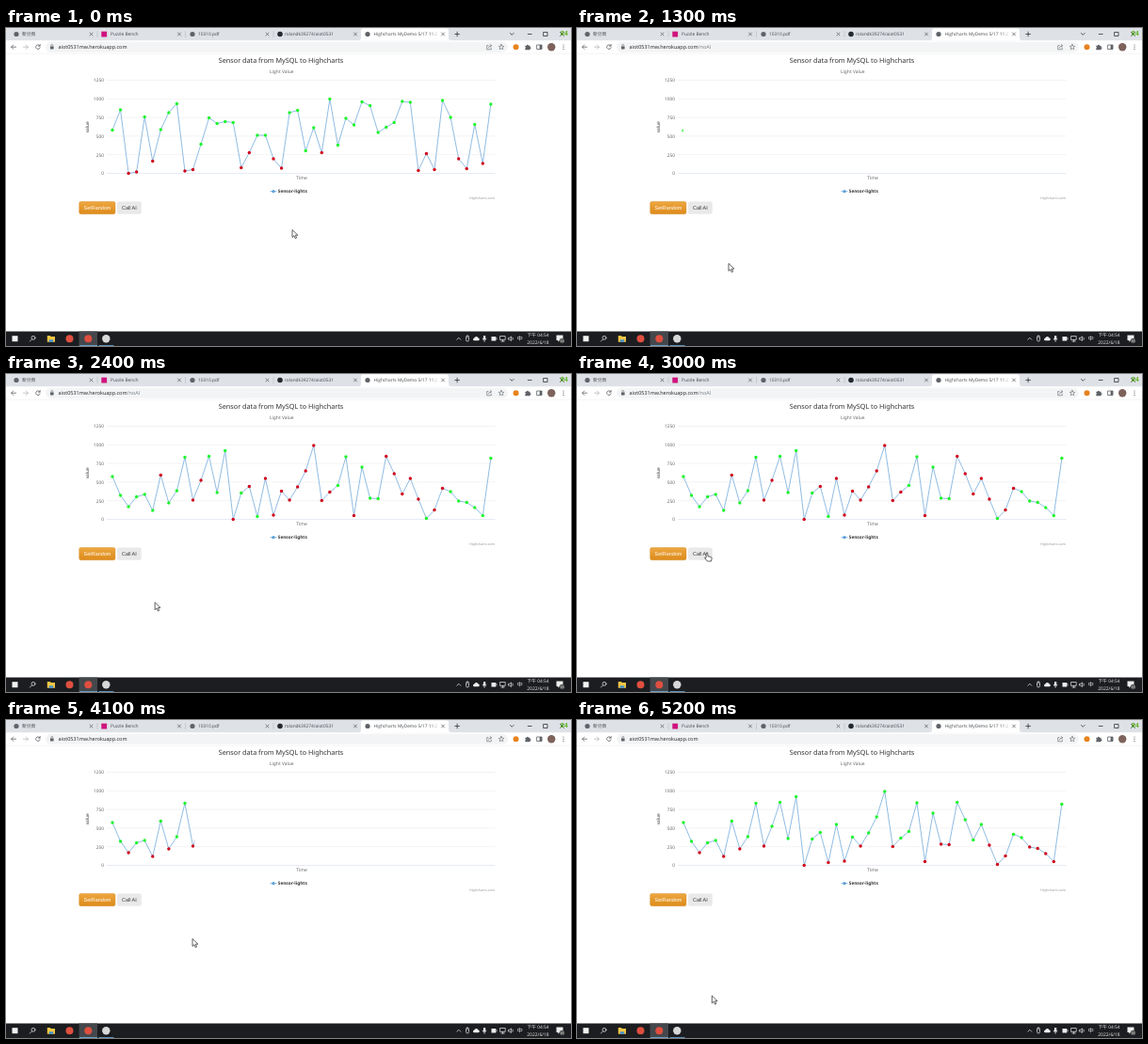
An HTML page for the animation above (5.3 s loop, 600x338 px).

```html
<!DOCTYPE html>
<html>
<head>
<meta charset="utf-8">
<style>
html, body { margin: 0; width: 100%; height: 100%; overflow: hidden; background: #fff; }
svg { display: block; width: 600px; height: 338px; }
text { font: 4.8px "Open Sans", "Noto Sans", "Noto Sans CJK TC", "Noto Sans CJK", sans-serif; text-rendering: geometricPrecision; white-space: pre; }
#chart text { font-family: "Noto Sans", sans-serif; }
.page { font: 5.47px "Liberation Sans", Arial, sans-serif; fill: #333; }
.mid { text-anchor: middle; }
.end { text-anchor: end; }
.ink { fill: none; stroke: #5f6368; stroke-width: .8; stroke-linecap: round; stroke-linejoin: round; }
.tray { fill: none; stroke: #eee; stroke-width: .7; stroke-linecap: round; stroke-linejoin: round; }
</style>
</head>
<body>
<svg viewBox="0 0 600 338">
  <defs>
    <linearGradient id="amber" x2="0" y2="1"><stop stop-color="#eda741"/><stop offset="1" stop-color="#dd8b1a"/></linearGradient>
    <linearGradient id="fade"><stop stop-color="#fff" stop-opacity="0"/><stop offset="1" stop-color="#fff"/></linearGradient>
    <clipPath id="reveal"><rect id="wipe" x="107" y="50" width="0" height="110"/></clipPath>
    <clipPath id="tabClip"><rect x="380" y="0" width="79.5" height="13"/></clipPath>
  </defs>
  <rect width="600" height="338" fill="#fff"/>

  <!-- tab strip -->
  <rect width="600" height="13.2" fill="#dee1e6"/>
  <path d="M374 13.2q3 0 3-3V3q0-2.5 2.5-2.5H467.500q2.500 0 2.500 2.500v7.200q0 3 3 3z" fill="#fff"/>
  <path class="ink" style="stroke:#a5a9ae;stroke-width:.4" d="M97 3.500v6M190.500 3.500v6M284 3.500v6"/>
  <circle cx="11" cy="6.500" r="2.600" fill="#5f6368"/>
  <rect x="101.300" y="3.700" width="5.800" height="5.800" fill="#d0127d"/>
  <circle cx="198" cy="6.500" r="2.600" fill="#5f6368"/>
  <circle cx="291" cy="6.500" r="2.800" fill="#24292e"/>
  <g fill="#45494d">
    <text x="17" y="8.400">新分頁</text>
    <text x="111" y="8.400">Puzzle Bench</text>
    <text x="204" y="8.400">10310.pdf</text>
    <text x="296" y="8.400">rolandk39274/aiot0531</text>
    <text id="tab" x="390.500" y="8.400" clip-path="url(#tabClip)"></text>
  </g>
  <rect x="451" y="2" width="9" height="9" fill="url(#fade)"/>
  <circle id="favicon" cx="384" cy="6.500" r="2.600" fill="#5f6368"/>
  <path id="spinner" d="M384 4a2.500 2.500 0 0 1 2.500 2.500" fill="none" stroke="#1a73e8" stroke-width=".8"/>
  <g id="closers" class="ink"></g>
  <path class="ink" style="stroke:#333" d="M476.800 6.500h4.600M479.100 4.200v4.600M535.500 5.500l1.800 1.800 1.800-1.800M554.300 6.500h3.800M571 4.500h4v4h-4zM588.500 4.500l4 4m0-4l-4 4"/>
  <text x="588.800" y="7.800" fill="#62b52c" style="font-size:7px;font-weight:700">84</text>

  <!-- toolbar -->
  <rect x="42" y="14.800" width="491" height="10.900" rx="5.450" fill="#f3f4f5"/>
  <path d="M0 27.200H600" stroke="#e4e6e8" stroke-width=".4"/>
  <path class="ink" d="M10.500 20.200H5.700M7.800 18l-2.200 2.200 2.200 2.200"/>
  <path class="ink" style="stroke:#b5b8bc" d="M18.500 20.200h4.800M21.200 18l2.200 2.200-2.200 2.200"/>
  <path id="reload" class="ink" d="M35.700 18.600a2.300 2.300 0 1 0 .5 2.200M36.200 17.500v1.700h-1.700"/>
  <path id="stop" class="ink" d="M31.800 18l4 4m0-4l-4 4"/>
  <rect x="47" y="19.400" width="3.600" height="3" rx=".4" fill="#5f6368"/>
  <path class="ink" style="stroke-width:.6" d="M47.800 19.300v-.8a1 1 0 0 1 2 0v.8"/>
  <text x="55.500" y="22" fill="#202124" style="font-size:5.470px">aiot0531mw.herokuapp.com<tspan id="path" fill="#777b80">/noAI</tspan></text>
  <path class="ink" style="stroke-width:.6" d="M512 18.500h-1.300v4.300h4.600v-1.600M512.300 21q.3-2.200 3-2.200M514.200 17.500l1.500 1.300-1.500 1.300"/>
  <path class="ink" style="stroke-width:.6" d="M526 17.400l.8 1.800 2 .2-1.500 1.300.4 2-1.700-1-1.700 1 .4-2-1.500-1.300 2-.2z"/>
  <circle cx="541.500" cy="20.200" r="3" fill="#e8821e"/>
  <path d="M551.300 18.700h1.600a1 1 0 0 1 2 0h1.600v1.600a1 1 0 0 1 0 2v.9h-5.200v-1.500a.9.900 0 0 0 0-1.700z" fill="#5f6368"/>
  <path class="ink" d="M564 18h5v4.500h-5z"/><rect x="566.600" y="18" width="2.500" height="4.500" fill="#5f6368"/>
  <circle cx="579.200" cy="20.200" r="4.200" fill="#7d635c"/>
  <g fill="#5f6368"><circle cx="592" cy="18" r=".6"/><circle cx="592" cy="20.200" r=".6"/><circle cx="592" cy="22.400" r=".6"/></g>

  <!-- web page -->
  <g id="chart">
    <text class="mid" x="292" y="37.300" fill="#333" style="font-size:7.250px">Sensor data from MySQL to Highcharts</text>
    <text class="mid" x="292.800" y="48.200" fill="#666" style="font-size:4.900px">Light Value</text>
    <g id="grid"></g>
    <text class="mid" x="314" y="161.300" fill="#666" style="font-size:5px">Time</text>
    <text class="mid" transform="translate(88.300 105.300) rotate(-90)" fill="#333">value</text>
    <path d="M280.500 173.700h7" stroke="#6aa8dd" stroke-width=".8"/><circle cx="284" cy="173.700" r="1.600" fill="#5b9fd8"/>
    <text x="288.800" y="175.300" fill="#333" style="font-size:4.750px;font-weight:700">Sensor-lights</text>
    <text class="end" x="519" y="182.400" fill="#999" style="font-size:3.650px">Highcharts.com</text>
    <g clip-path="url(#reveal)"><g id="seriesA"></g><g id="seriesB"></g><g id="seriesC"></g></g>
  </g>
  <text id="insert" class="page" x="77.300" y="33.400">Insert Highchart Here</text>
  <rect id="focus" x="77.700" y="184.500" width="38.300" height="13.200" rx="1.700" fill="url(#amber)"/>
  <text class="page mid" x="97" y="192.900" style="fill:#fff">SetRandom</text>
  <rect x="118" y="184.500" width="25.700" height="13.200" rx="1.700" fill="#e9e9e9"/>
  <text class="page mid" x="130.900" y="192.900">Call AI</text>
  <g id="status">
    <path d="M0 314H198.500q1.500 0 1.500 1.500V322.500H0z" fill="#dee1e6"/>
    <text x="1.500" y="320" fill="#5f6368" style="font-size:4.700px">正在等候 aiot0531mw.herokuapp.com...</text>
  </g>

  <!-- taskbar -->
  <rect y="322.500" width="600" height="15.500" fill="#1b1d20"/>
  <rect x="77.500" y="322.500" width="19.500" height="15.500" fill="#44474b"/>
  <path d="M78 337.600h19M98.500 337.600h16" stroke="#76b9ed" stroke-width=".8"/>
  <rect x="6.500" y="327.200" width="6" height="6" fill="#f2f2f2"/>
  <circle class="tray" cx="29" cy="329.300" r="2"/><path class="tray" d="M27.500 330.900l-2.200 2.200"/>
  <path d="M43.800 327h3l1 1h4.200v5.700h-8.200z" fill="#f5c644"/><rect x="45.700" y="331.300" width="4.500" height="2.400" fill="#3f93d4"/>
  <circle cx="67.500" cy="330.200" r="4" fill="#df4f3f"/>
  <circle cx="87.300" cy="330.200" r="4" fill="#df4f3f"/>
  <circle cx="106.300" cy="330.200" r="4.200" fill="#d8d8d8"/>
  <path class="tray" d="M478.800 331.200l2-2 2 2M488.500 328.500q0-1.500 1.500-1.500t1.500 1.500v3q0 1.500-1.500 1.500t-1.500-1.500zM490 327v2.200"/>
  <path d="M497 332.300a1.500 1.500 0 0 1 .3-2.900 2.200 2.200 0 0 1 4-.2 1.600 1.600 0 0 1 .4 3.100zM507 327h2.200v4H507zM515.500 328h4.800v4.400h-4.800z" fill="#eee"/>
  <path class="tray" d="M506.300 330q0 2 1.800 2t1.800-2M508.100 332v1.300M521 329.500v1.400M525 327.500h5.200v3.900H525zM527.600 331.400v1.700M526 333.100h3.200M533.800 329.300h1.100l1.500-1.400v4.600l-1.500-1.400h-1.100zM538 329q.9 1.200 0 2.400"/>
  <g class="mid" fill="#f0f0f0">
    <text x="545.700" y="332.300" style="font-size:6px">中</text>
    <text x="565" y="328.400">下午 04:54</text>
    <text x="565" y="335.800" style="font-size:4.950px">2022/6/18</text>
  </g>
  <path d="M584.500 326.500h7v5.500h-3.500l-1.700 1.700V332h-1.800z" fill="#eee"/>
  <circle cx="590.500" cy="332.500" r="2.700" fill="#555"/>
  <text class="mid" x="590.500" y="333.800" fill="#fff" style="font-size:3.600px">16</text>

  <path id="arrow" d="M0 0V8l1.900-1.700 1.300 2.900 1.400-.6-1.300-2.900H5.900z" fill="#fff" stroke="#222" stroke-width=".7" stroke-linejoin="round"/>
  <path id="hand" d="M-.9.700q.9-1.300 1.800 0V3.700l3.200.7q1 .3 1 1.300L4.600 9H.4L-2.300 5.700q-.2-1.100 1.400-.3z" fill="#fff" stroke="#222" stroke-width=".7" stroke-linejoin="round"/>
</svg>
<script>
const $ = id => document.getElementById(id);
const LOOP = 5300, STEP = 100;
const LEFT = 107, RIGHT = 519.5, ZERO = 154.5;
const px = i => 113 + i * 8.55;
const py = v => ZERO - v * 0.0792;

const before = [581, 852, 0, 19, 758, 164, 587, 815, 935, 32, 51, 392, 745, 669, 695, 682,
  76, 278, 511, 511, 196, 69, 815, 846, 303, 613, 278, 998, 379, 739, 650, 960,
  909, 549, 619, 682, 966, 954, 38, 265, 51, 979, 751, 196, 63, 657, 133, 928];
const after = [575, 322, 170, 303, 335, 120, 594, 221, 385, 834, 259, 524, 846, 360, 922, 0,
  354, 442, 38, 549, 57, 379, 259, 436, 650, 991, 253, 366, 455, 840, 51, 701,
  284, 278, 846, 613, 341, 549, 272, 13, 126, 417, 373, 246, 227, 158, 51, 821];
const randomRed = new Set([6, 10, 11, 15, 17, 19, 20, 21, 22, 23, 24, 25, 26, 27, 30, 34, 35, 36, 37, 38, 40, 41]);
const isLow = v => v < 300;

function drawSeries(id, data, isRed) {
  const line = data.map((v, i) => `${px(i)},${py(v)}`).join(' ');
  const dots = data.map((v, i) =>
    `<circle cx="${px(i)}" cy="${py(v)}" r="1.7" fill="${isRed(v, i) ? '#d0021b' : '#1df52d'}"/>`);
  $(id).innerHTML = `<polyline points="${line}" fill="none" stroke="#74abdc" stroke-width=".8" stroke-linejoin="round"/>` + dots.join('');
}
drawSeries('seriesA', before, isLow);
drawSeries('seriesB', after, (v, i) => randomRed.has(i));
drawSeries('seriesC', after, isLow);

$('grid').innerHTML = [0, 250, 500, 750, 1000, 1250].map(v =>
  `<path d="M${LEFT} ${py(v)}H${RIGHT}" stroke="${v ? '#e6e6e6' : '#ccd6eb'}" stroke-width=".5"/>
   <text class="end" x="104" y="${py(v) + 1.8}" fill="#666">${v}</text>`).join('');
$('closers').innerHTML = [90.5, 184, 277.5, 371, 464].map(x =>
  `<path d="M${x - 1.5} 5l3 3m0-3l-3 3"/>`).join('');

// time, x, y
const pointer = [
  [0, 304, 214.5], [100, 304, 214.5], [400, 97, 191], [500, 97, 191], [850, 161, 250.3],
  [2300, 161, 250.3], [2750, 138, 190], [3200, 138, 190], [3550, 198, 232.5],
  [4750, 198, 232.5], [5150, 143.3, 293], [LOOP, 143.3, 293]
];
// time, tab state, page, status bar, path
const stages = [
  [0, 'idle', 'A', 0, 0], [500, 'idle', 'A', 0, 1], [600, 'noAI', 'A', 1, 1],
  [1100, 'idle', '', 1, 1], [1200, 'idle', 'B', 1, 1], [1300, 'idle', 'B', 0, 1],
  [3300, 'root', 'B', 1, 0], [3600, 'idle', '', 1, 0], [3800, 'idle', 'C', 1, 0], [3900, 'idle', 'C', 0, 0]
];
const titles = {
  idle: 'Highcharts MyDemo 5/17 11:2',
  noAI: 'https://aiot0531mw.herokuapp.com',
  root: 'aiot0531mw.herokuapp.com'
};
const wipeStart = { A: -1000, B: 1225, C: 3784 };

function pointerAt(t) {
  const k = pointer.findIndex(p => p[0] > t);
  const [t0, x0, y0] = pointer[k - 1], [t1, x1, y1] = pointer[k];
  const u = (t - t0) / (t1 - t0), e = u * u * (3 - 2 * u);
  return [x0 + (x1 - x0) * e, y0 + (y1 - y0) * e];
}
const show = (id, on) => { $(id).style.display = on ? '' : 'none'; };

function render(t) {
  const [, tab, page, status, path] = stages.filter(s => s[0] <= t).pop();
  const busy = tab !== 'idle';
  if ($('tab').textContent !== titles[tab]) $('tab').textContent = titles[tab];
  show('favicon', !busy);
  show('spinner', busy);
  show('reload', !busy);
  show('stop', busy);
  show('path', path);
  show('status', status);
  show('chart', page);
  show('insert', !page);
  for (const s of 'ABC') show('series' + s, s === page);
  $('spinner').setAttribute('transform', `rotate(${(t - 900) * 0.36} 384 6.5)`);

  if (page) {
    const u = Math.min(1, Math.max(0, (t - wipeStart[page]) / 1000));
    $('wipe').setAttribute('width', (RIGHT - LEFT) * (1 - Math.cos(Math.PI * u)) / 2);
  }

  const focused = t >= 500 && t < 1100;
  $('focus').setAttribute('stroke', focused ? '#222' : '#d08a25');
  $('focus').setAttribute('stroke-width', focused ? 1.1 : 0.4);

  const [x, y] = pointerAt(t);
  const over = x > 77.5 && x < 143.7 && y > 184.5 && y < 197.7;
  show('arrow', !over);
  show('hand', over);
  $(over ? 'hand' : 'arrow').setAttribute('transform', `translate(${x} ${y})`);
}

const start = performance.now();
function tick() {
  const t = (performance.now() - start) % LOOP;
  render(Math.floor(t / STEP) * STEP);
  requestAnimationFrame(tick);
}
tick();
</script>
</body>
</html>
```
